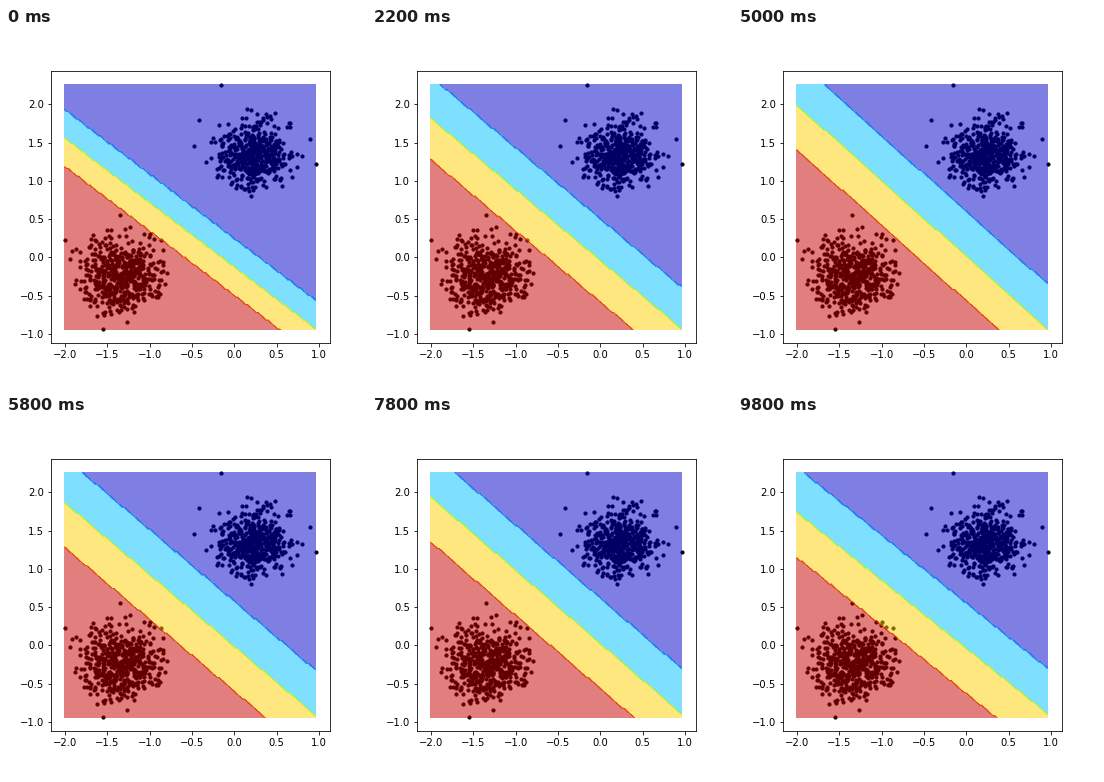
Recreate the animation shown at these times as a matplotlib script. Size 360x360 px, loop 10000 ms.

```python
import numpy as np
import matplotlib.pyplot as plt
from matplotlib.animation import FuncAnimation

SIZE, DPI = 360, 72
FRAMES, STEP_MS = 50, 200
ORIGIN = np.array([228.3, 229.45])  # stage position of (0, 0)
UNIT = np.array([84.6, -76.6])      # stage pixels per data unit
X0, X1 = -2.003, 0.957
Y0, Y1 = -0.945, 2.255

plt.rcParams.update({"font.family": "DejaVu Sans", "font.size": 10})
rng = np.random.default_rng(7)


def blob(center, std, count=500, reach=2.6):
    """Normal cloud without its far tails."""
    pts = rng.normal(size=(2 * count, 2))
    pts = pts[np.hypot(*pts.T) < reach][:count]
    return np.array(center) + pts * std


strays = [(-0.16, 2.255), (0.97, 1.22), (-2.0, 0.23), (-1.55, -0.94),
          (-0.42, 1.79), (0.90, 1.55), (-0.48, 1.46), (-1.35, 0.55),
          (-1.0, 0.31), (-0.87, 0.23)]
points = np.vstack([blob((0.23, 1.37), 0.225),
                    blob((-1.36, -0.215), 0.245),
                    strays])

xx, yy = np.meshgrid(np.linspace(X0, X1, 149), np.linspace(Y0, Y1, 161))
share = (xx - X0) / (X1 - X0)
levels = np.linspace(0, 3.2, 9)


def classes(t):
    """Class 0 to 3: how many of three parallel borders lie above a point."""
    left = np.interp(t, [0, 2200, 4000, 5000, 6600, 7800, 9800],
                     [1.56, 1.82, 1.99, 1.99, 1.74, 1.94, 1.74])
    right = np.interp(t, [5000, 6600], [-0.925, -0.885])
    gap = 0.59 - 0.22 * np.exp(-t / 1450)
    middle = left + (right - left) * share
    return sum((yy < middle + k * gap).astype(float) for k in (-1, 0, 1))


fig = plt.figure(figsize=(SIZE / DPI, SIZE / DPI), dpi=DPI, facecolor="white")
ax = fig.add_axes([0.125, 0.125, 0.775, 0.755])
xlim = (np.array([45, 324]) - ORIGIN[0]) / UNIT[0]
ylim = (np.array([315, 43.2]) - ORIGIN[1]) / UNIT[1]
ax.set(xlim=xlim, ylim=ylim,
       xticks=np.arange(-2, 1.1, 0.5), yticks=np.arange(-1, 2.1, 0.5))
ax.scatter(*points.T, s=10, c="black")
regions = None


def draw(i):
    global regions
    if regions is not None:
        regions.remove()
    # The factor keeps whole classes off the band limits
    regions = ax.contourf(xx, yy, 1.01 * classes(i * STEP_MS), levels=levels,
                          cmap="jet", vmin=0, vmax=3.2, alpha=0.5)
    return [regions]


anim = FuncAnimation(fig, draw, frames=FRAMES, interval=STEP_MS,
                     init_func=lambda: draw(0), repeat=True, repeat_delay=0)
plt.show()
```
